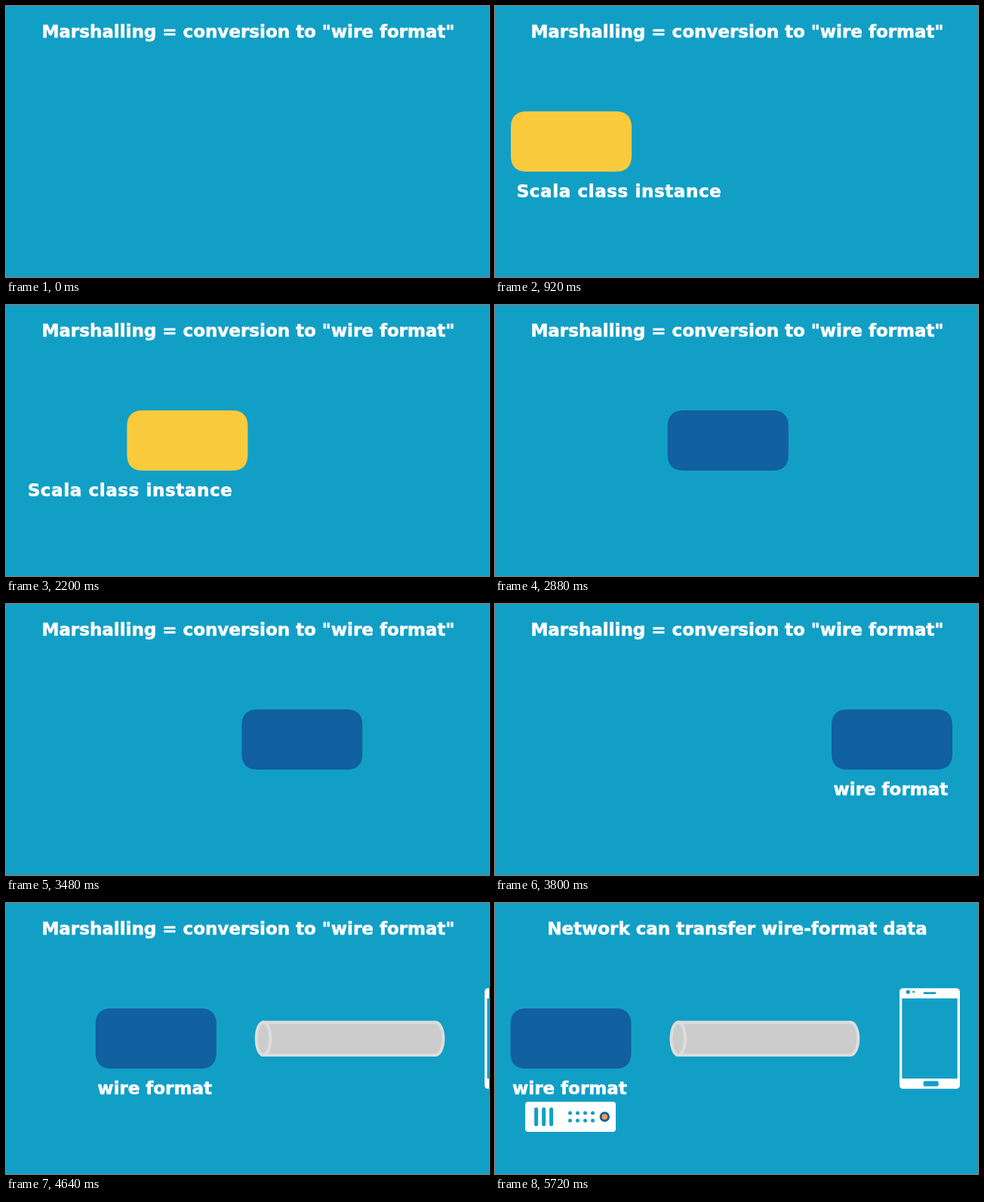
These frames come from a looping animation (640x360 px, 8000 ms). An HTML page:

```html
<!DOCTYPE html>
<html lang="en">
<meta charset="utf-8">
<title>Marshalling</title>
<style>
html, body { margin: 0; height: 100%; overflow: hidden; background: #129fc6; }
svg { display: block; width: 100%; height: 100%; }
text { font: bold 23px "DejaVu Sans", sans-serif; fill: #fff; stroke: #fff; stroke-width: .6; }
#instance { letter-spacing: .6px; }
.pipe { fill: #ccc; stroke: #ddd; stroke-width: 4; }
.hole { fill: #129fc6; }
.bars { stroke: #129fc6; stroke-width: 5; stroke-linecap: round; }
.dots { stroke: #129fc6; stroke-width: 5; stroke-linecap: round; stroke-dasharray: 0 10; }
</style>
<svg viewBox="0 0 640 360">
  <text id="title" x="321" y="42" text-anchor="middle"></text>
  <text id="instance" x="28.7" y="254">Scala class instance</text>
  <path id="block" d="M0 21Q0 0 21 0H139Q160 0 160 21V59Q160 80 139 80H21Q0 80 0 59Z"/>
  <text id="wire" y="254">wire format</text>

  <g id="network">
    <path class="pipe" d="M242.5 158.5H471.5A10.5 21.8 0 0 1 471.5 202H242.5Z"/>
    <ellipse class="pipe" cx="242.8" cy="180.2" rx="9.3" ry="21.8"/>
    <rect x="536" y="113.3" width="80" height="133.4" rx="4.5" fill="#fff"/>
    <g class="hole">
      <rect x="539.3" y="126.7" width="73.4" height="106.6"/>
      <circle cx="547.4" cy="118.2" r="2.6"/>
      <circle cx="554.6" cy="118" r="1.5"/>
      <rect x="567.7" y="118.3" width="16.5" height="2.7" rx="1"/>
      <rect x="567.7" y="236.4" width="20" height="7" rx="2"/>
    </g>
  </g>

  <g id="server">
    <rect x="40" y="264" width="120" height="40" rx="4" fill="#fff"/>
    <path class="bars" d="M54.6 274V294M64.6 274V294M74.6 274V294"/>
    <path class="dots" d="M99.5 279h31M99.5 289h31"/>
    <circle cx="145.3" cy="284" r="5.2" fill="#f9a04b" stroke="#11609f" stroke-width="3"/>
  </g>
</svg>
<script>
const LOOP = 8000, STEP = 40, PAN = 425.5;
const el = id => document.getElementById(id);
const title = el("title"), instance = el("instance"), block = el("block"),
      wire = el("wire"), network = el("network"), server = el("server");

const show = (node, on) => node.setAttribute("visibility", on ? "visible" : "hidden");
const place = (node, x, y) => node.setAttribute("transform", `translate(${x} ${y})`);
const ramp = (t, from, to) => Math.min(1, Math.max(0, (t - from) / (to - from)));

function draw(now) {
  const t = Math.floor(now % LOOP / STEP) * STEP;
  const encoded = t >= 2840;
  const pan = PAN * ramp(t, 4240, 4760);

  title.textContent = t < 4760 ? 'Marshalling = conversion to "wire format"'
    : t < 5720 ? "" : "Network can transfer wire-format data";

  const x = encoded ? 228.8 + 217.2 * ramp(t, 3280, 3800) - pan
                    : 21 + 209 * ramp(t, 1880, 2360);
  place(block, x, 140);
  block.setAttribute("fill", encoded ? "#11609f" : "#f9cb3c");
  place(wire, 448.5 - pan, 0);
  place(network, PAN - pan, 0);

  show(block, t >= 920);
  show(instance, t >= 920 && t < 2360);
  show(wire, t >= 3800);
  show(server, t >= 4760);
}

const start = performance.now();
function frame() {
  draw(performance.now() - start);
  requestAnimationFrame(frame);
}
frame();
</script>
</html>
```
